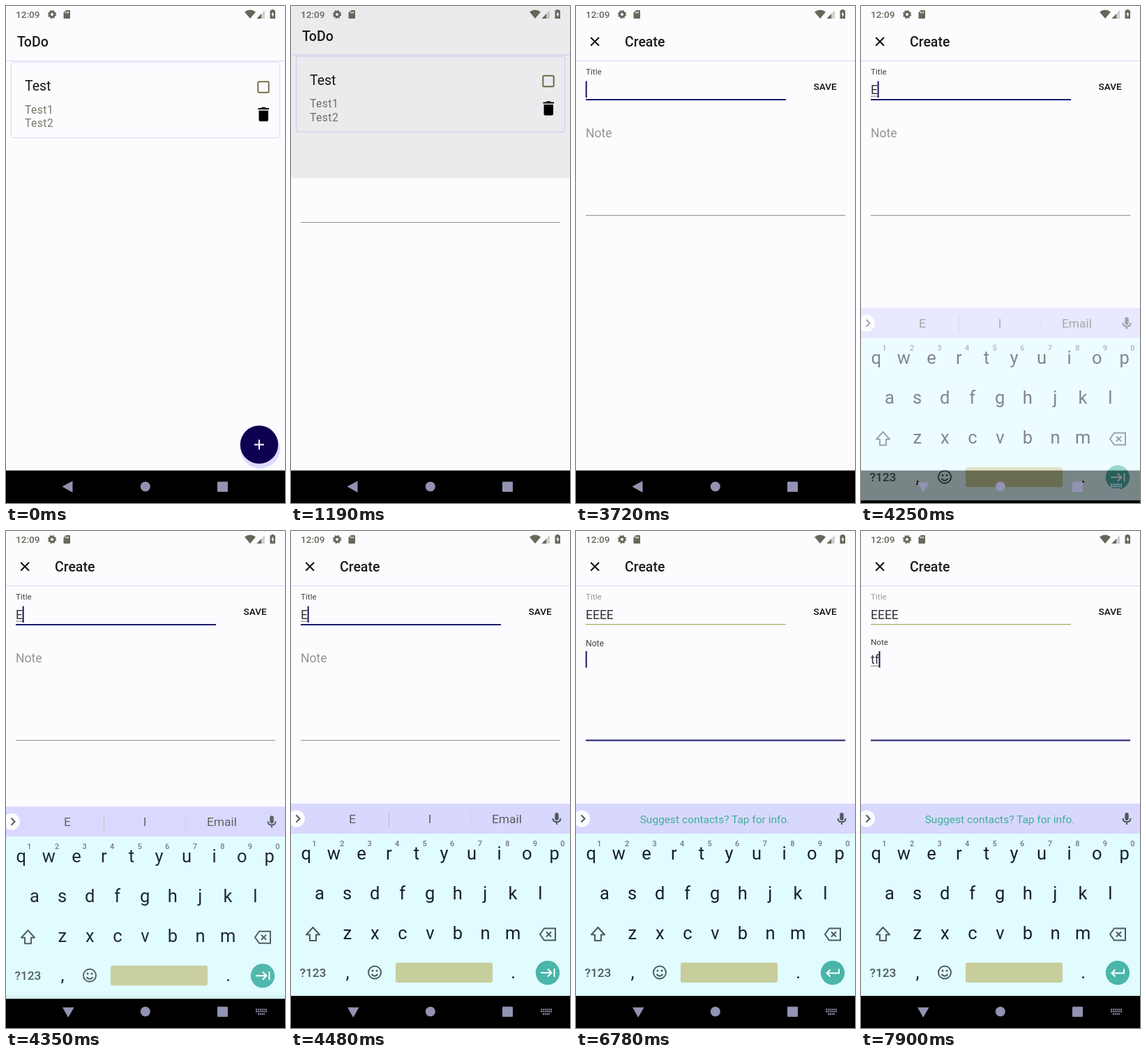
An HTML page that plays this animation: 400x711 px, repeating every 8 s.

```html
<!DOCTYPE html>
<html lang="en">
<head>
<meta charset="utf-8">
<title>ToDo</title>
<style>
  html, body { margin: 0; width: 100%; height: 100%; overflow: hidden; background: #fcfcff; }
  svg { display: block; width: 100%; height: 100%; font-family: Roboto, sans-serif; }
  text { white-space: pre; }
  .mid { text-anchor: middle; }
  .bar { font-size: 19.5px; font-weight: 500; fill: #1c1c1c; }
  .body { font-size: 15.6px; letter-spacing: .5px; fill: #77776a; }
  .input { font-size: 17.5px; fill: #303038; }
  .key { font-size: 25.5px; fill: #16202c; }
  .num { font-size: 11px; font-weight: 500; fill: #74748c; }
  .sug { font-size: 17.4px; fill: #5c5c5c; }
  .line { fill: none; stroke: #4d5a5e; stroke-width: 2; }
</style>
</head>
<body>
<svg viewBox="0 0 400 711">
  <defs>
    <clipPath id="reveal"><rect id="clip" width="400" height="711"/></clipPath>
  </defs>
  <rect width="400" height="711" fill="#fcfcff"/>

  <g id="list">
    <text class="bar" x="16" y="58">ToDo</text>
    <path d="M0 78.5H400" stroke="#d6d6fb"/>
    <rect x="7.5" y="80.5" width="385" height="108" rx="3" fill="none" stroke="#d6d6fb"/>
    <text x="27" y="121" font-size="19.45" fill="#161616">Test</text>
    <text class="body" x="27" y="153.5">Test1</text>
    <text class="body" x="27" y="173.3">Test2</text>
    <rect x="361.3" y="108.3" width="15.4" height="15.4" rx="1.5" fill="none" stroke="#75704c" stroke-width="2"/>
    <path d="M361.5 146H366L367 144.7H371.5L372.5 146H377V148H361.5ZM362.5 149.5H376V163Q376 165 374 165H364.5Q362.5 165 362.5 163Z"/>
    <circle id="shadow" cx="364.5" cy="633" r="28.5" fill="#dcdcff"/>
    <circle cx="363" cy="627.5" r="27.2" fill="#100052"/>
    <circle id="ripple" cx="363" cy="627.5" r="27" fill="#fff"/>
    <path d="M356 627.5H370M363 620.5V634.5" stroke="#fff" stroke-width="2"/>
  </g>
  <rect id="dim" width="400" height="711"/>

  <g id="page"><g clip-path="url(#reveal)">
    <rect width="400" height="711" fill="#fcfcff"/>
    <path d="M21.2 45L33 56.8M33 45L21.2 56.8" stroke="#111" stroke-width="2"/>
    <text class="bar" x="70" y="58">Create</text>
    <path d="M0 78.5H400" stroke="#d6d6fb"/>
    <text id="titleLabel" x="14" y="98" font-size="11.7">Title</text>
    <text id="title" class="input" x="14" y="126"></text>
    <rect id="titleMark" x="14" y="128.6" height="1" fill="#77775c"/>
    <rect id="titleLine" x="14" width="287"/>
    <text x="340.5" y="120" font-size="13.6" font-weight="500" fill="#111">SAVE</text>
    <text id="noteLabel" x="14">Note</text>
    <text id="note" class="input" x="14" y="190"></text>
    <rect id="noteMark" x="14" y="192.6" height="1" fill="#77775c"/>
    <rect id="noteLine" x="14" width="372"/>
    <rect id="cursor" width="2" height="23.5" fill="#16165c"/>
  </g></g>

  <g fill="#66665a">
    <text x="14" y="17" font-size="13.6" font-weight="500">12:09</text>
    <g fill="none" stroke="#66665a">
      <circle cx="66" cy="12" r="3.5" stroke-width="2.8"/>
      <circle cx="66" cy="12" r="5.2" stroke-width="1.8" stroke-dasharray="2.3 1.78"/>
    </g>
    <path d="M86 6H91Q92 6 92 7V17Q92 18 91 18H83.500Q82.500 18 82.500 17V9.500Z"/>
    <path d="M85.500 8V10.500M87.500 8V10.500M89.500 8V10.500" stroke="#fcfcff"/>
    <path d="M342 8.500Q350 2.500 358 8.500L350 18Z"/>
    <path d="M371 6V18H359.500Z" opacity=".3"/>
    <path d="M366 11.200V18H359.500Z"/>
    <path d="M380.500 5H384V6.300H386V18H378.500V6.300H380.500Z"/>
    <path d="M383 8L380.300 12.800H382V16.300L384.500 11.300H383Z" fill="#fcfcff"/>
  </g>

  <rect y="664.500" width="400" height="47"/>
  <g id="board">
    <rect y="390" width="400" height="43" fill="#d8d8ff"/>
    <rect y="433" width="400" height="232" fill="#e0fcff"/>
    <circle cx="8" cy="411.500" r="12" fill="#fcfcff"/>
    <path class="line" d="M7.500 406.500L12.500 411.500L7.500 416.500"/>
    <g id="sugs">
      <path d="M140.500 400V424" stroke="#bfc0b4"/>
      <path d="M257.500 400V424" stroke="#cdcdf0"/>
      <text class="sug mid" x="88" y="418"></text>
      <text class="sug mid" x="199" y="418"></text>
      <text class="sug mid" x="309.500" y="418"></text>
    </g>
    <text id="tip" class="mid" x="199" y="417.500" font-size="15.5" fill="#3eaf98">Suggest contacts? Tap for info.</text>
    <rect x="378.300" y="403" width="5.400" height="11" rx="2.700" fill="#4d5a5e"/>
    <path class="line" stroke-width="1.600" d="M375.500 411Q375.500 416.300 381 416.300T386.500 411M381 416.300V420"/>
    <g id="keys"></g>
    <path class="line" d="M31.500 567L41 577.500H36V586H27V577.500H22Z" stroke-linejoin="round"/>
    <path class="line" d="M363 568.500H379V585.500H363L357 577ZM366 573.500L373 580.500M373 573.500L366 580.500"/>
    <text class="mid" x="31.500" y="638" font-size="17.300" font-weight="500" fill="#4d5a5e">?123</text>
    <circle class="line" cx="120" cy="631.500" r="9"/>
    <path class="line" stroke-width="1.500" d="M115.500 634Q120 639.500 124.500 634"/>
    <circle cx="117" cy="629" r="1.500" fill="#4d5a5e"/>
    <circle cx="123" cy="629" r="1.500" fill="#4d5a5e"/>
    <rect x="150" y="617.500" width="139" height="28.500" rx="3" fill="#c8cd9c"/>
    <circle cx="368" cy="632" r="17.200" fill="#4ab5a9"/>
    <path id="action" fill="none" stroke="#fff" stroke-width="2"/>
  </g>

  <g fill="#9292b2">
    <path id="back"/>
    <circle cx="199.800" cy="687.500" r="7"/>
    <rect x="303" y="680.500" width="15" height="14.500" rx="1"/>
    <path id="imeIcon" d="M358 684.500H374M358 687.500H374M361 691H371" stroke="#9292b2" stroke-width="2" stroke-dasharray="2 .8"/>
  </g>
</svg>
<script>
const LOOP = 8000, NAVY = '#1c1c6c';
const $ = id => document.getElementById(id);
const set = (id, attrs) => { for (const k in attrs) $(id).setAttribute(k, attrs[k]); };
const show = (id, on) => set(id, { visibility: on ? 'visible' : 'hidden' });
const ramp = (t, a, b) => Math.min(1, Math.max(0, (t - a) / (b - a)));
const out = (p, n) => 1 - (1 - p) ** n;
const mix = (a, b, p) => a + (b - a) * p;
const smooth = p => p * p * (3 - 2 * p);
const grey = (a, b, p) => { const v = Math.round(mix(a, b, p)); return `rgb(${v},${v},${v - 8})`; };
// last value whose start time has passed
const at = (t, steps) => steps.filter(s => s[0] <= t).pop()[1];

const label = (cls, x, y, s) => `<text class="${cls} mid" x="${x}" y="${y}">${s}</text>`;
const row = (cls, x, y, chars) => [...chars].map((c, i) => label(cls, x + 39.55 * i, y, c)).join('');
$('keys').innerHTML =
  row('key', 21.8, 469.5, 'qwertyuiop') + row('num', 33.5, 451, '1234567890') +
  row('key', 41, 526.5, 'asdfghjkl') + row('key', 80.8, 584, 'zxcvbnm') +
  label('key', 81, 640, ',') + label('key', 318.5, 640, '.');

const titles = [[0, ''], [4030, 'E'], [5940, 'EE'], [6200, 'EEEE']];
const notes = [[0, ''], [7500, 't'], [7900, 'tf']];
const hints = [[0, ['E', 'I', 'Email']], [5940, ['EE', 'EEE', 'WEEE']], [6200, ['EEE', 'WE', 'HE']]];
const blinks = [[0, 0], [1630, 1], [2210, 0], [2700, 1], [3200, 0], [3720, 1],
  [5010, 0], [5540, 1], [5760, 0], [5940, 1]];

function drawList(t) {
  const press = ramp(t, 50, 390) - ramp(t, 530, 880);
  set('shadow', { r: 28.5 + press });
  set('ripple', { opacity: .12 * press, r: 27 * out(ramp(t, 50, 390), 2) });
  const p = out(ramp(t, 1060, 1500), 3);
  set('list', { transform: `translate(0 ${-13 * p})` });
  set('dim', { opacity: t < 1630 ? .1 * p : 0 });
  set('page', { transform: `translate(0 ${29 * (1 - p)})` });
  set('clip', { y: 682 * (1 - p) });
  show('page', t >= 1060);
}

function drawForm(t) {
  const inNote = t >= 6600, p = smooth(ramp(t, 6600, 6820));
  $('title').textContent = at(t, titles);
  $('note').textContent = at(t, notes);
  const tw = $('title').getComputedTextLength(), nw = $('note').getComputedTextLength();
  set('titleMark', { width: inNote ? 0 : tw });
  set('noteMark', { width: nw });
  set('titleLabel', { fill: grey(70, 160, p) });
  set('titleLine', inNote ? { y: 133, height: 1.2, fill: '#a9a95c' } : { y: 133, height: 2, fill: NAVY });
  set('noteLabel', { y: mix(188, 162.5, p), 'font-size': mix(17.5, 11.7, p), fill: grey(150, 60, p) });
  set('noteLine', inNote ? { y: 298.5, height: 2, fill: NAVY } : { y: 299, height: 1, fill: '#90908c' });
  set('cursor', { x: 13.7 + (inNote ? nw : tw), y: inNote ? 172 : 107.5, opacity: at(t, blinks) });
}

function drawBoard(t) {
  const inNote = t >= 6600, rest = 1 - out(ramp(t, 4250, 4480), 4);
  set('board', { transform: `translate(0 ${43 * rest})`, opacity: 1 - .48 * rest });
  show('board', t >= 4250);
  const words = at(t, hints);
  $('sugs').querySelectorAll('text').forEach((el, i) => el.textContent = words[i]);
  set('sugs', { opacity: inNote ? 0 : 1 });
  set('tip', { opacity: inNote ? 1 : 0 });
  set('action', { d: inNote
    ? 'M377 626.5V632.5H360M364.500 627.500L359.500 632.500L364.500 637.500'
    : 'M358 632H373M368 626.500L373.500 632L368 637.500M377.500 626V638' });
  const typing = t >= 4030;
  set('back', { d: typing ? 'M81 681.500H97.500L89.200 696Z' : 'M80.500 687.500L95.500 679.500V696Z' });
  show('imeIcon', typing);
}

function frame() {
  const t = performance.now() % LOOP;
  drawList(t);
  drawForm(t);
  drawBoard(t);
  requestAnimationFrame(frame);
}
frame();
</script>
</body>
</html>
```
